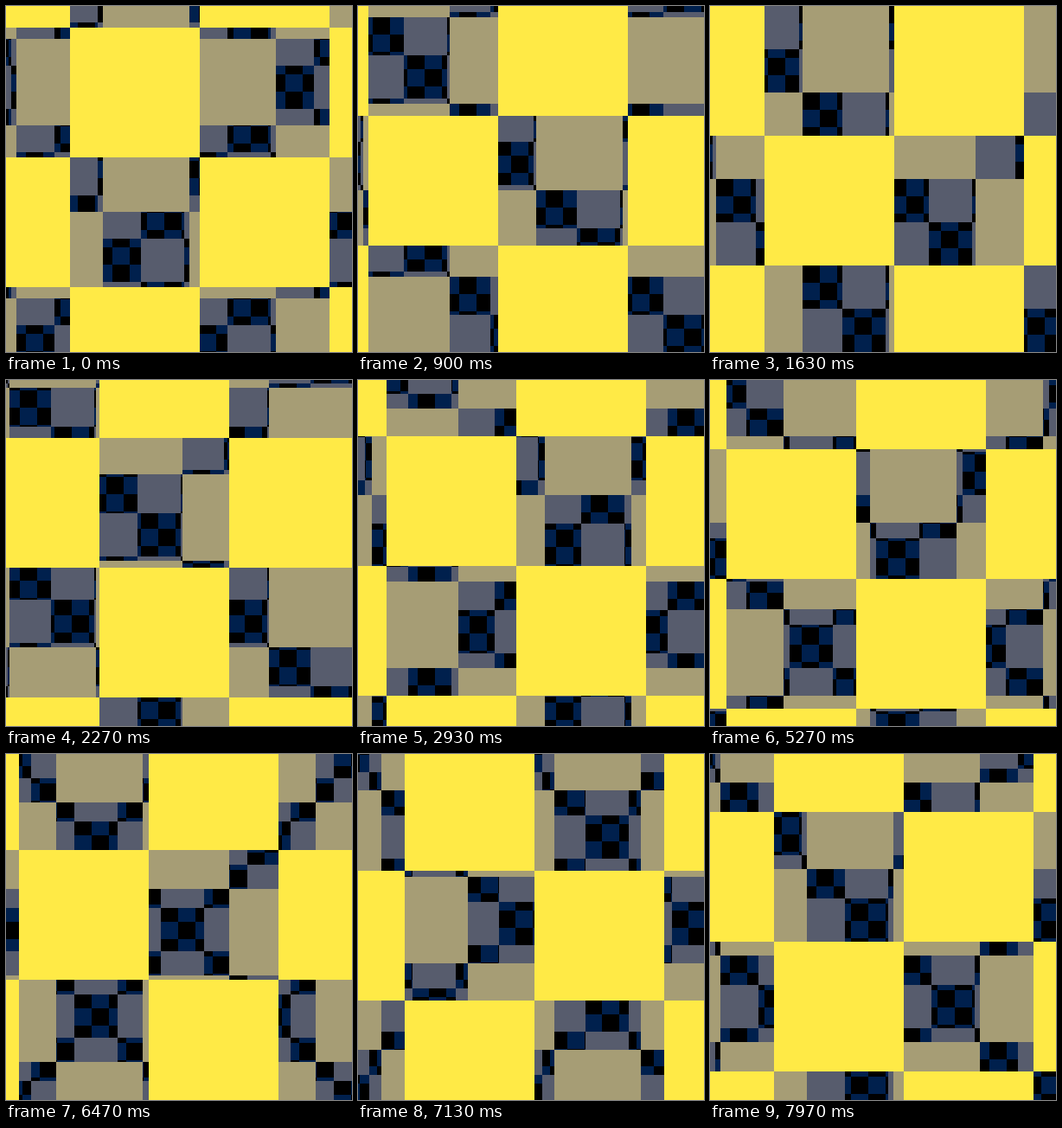
Recreate the animation shown at these times as an HTML page without scripts. Size 400 by 400 pixels, loop 8 s.

```html
<!DOCTYPE html>
<html lang="en">
<head>
<meta charset="utf-8">
<title>Drifting checkerboards</title>
<style>
  @property --n {
    syntax: "<number>";
    inherits: true;
    initial-value: 1;
  }

  html, body {
    margin: 0;
    width: 100%;
    height: 100%;
    overflow: hidden;
    background: #000;
  }

  /* --n counts 240 ticks; x swings once in 240 ticks, y once in 150 */
  svg {
    display: block;
    width: 100%;
    height: 100%;
    shape-rendering: crispEdges;
    --x: (412px * cos(var(--n) * 1.5deg) - 400px);
    --y: (268px * cos(var(--n) * 2.4deg - 30deg) - 400px);
    animation: tick 8s steps(240) -4ms infinite;
  }

  @keyframes tick {
    from { --n: 1; }
    to { --n: 241; }
  }

  /* --size is the cell edge, --pace the share of the common drift */
  .layer {
    transform:
      translate(calc(200px + var(--pace) * var(--x)), calc(200px + var(--pace) * var(--y)))
      scale(var(--size))
      translate(-11px, -11px);
  }
  .navy   { fill: #00204d; --size: 20;  --pace: .25; }
  .grey   { fill: #575c6d; --size: 50;  --pace: .5; }
  .tan    { fill: #a69d75; --size: 100; --pace: 1; }
  .yellow { fill: #ffea46; --size: 150; --pace: 2; }
</style>
</head>
<body>
<svg viewBox="0 0 400 400">
  <defs>
    <!-- columns xor rows make an 8 by 8 board, doubled up to 32 by 32 -->
    <path id="tile" fill-rule="evenodd" d="M1 0v8h1v-8h1v8h1v-8h1v8h1v-8h1v8h1v-8z
      M0 0h8v1h-8v1h8v1h-8v1h8v1h-8v1h8v1h-8z"/>
    <g id="pair"><use href="#tile"/><use href="#tile" x="8"/></g>
    <g id="row"><use href="#pair"/><use href="#pair" x="16"/></g>
    <g id="half"><use href="#row"/><use href="#row" y="8"/></g>
    <g id="board"><use href="#half"/><use href="#half" y="16"/></g>
  </defs>
  <rect width="400" height="400"/>
  <use class="layer navy" href="#board"/>
  <use class="layer grey" href="#board"/>
  <use class="layer tan" href="#board"/>
  <use class="layer yellow" href="#board"/>
</svg>
</body>
</html>
```
